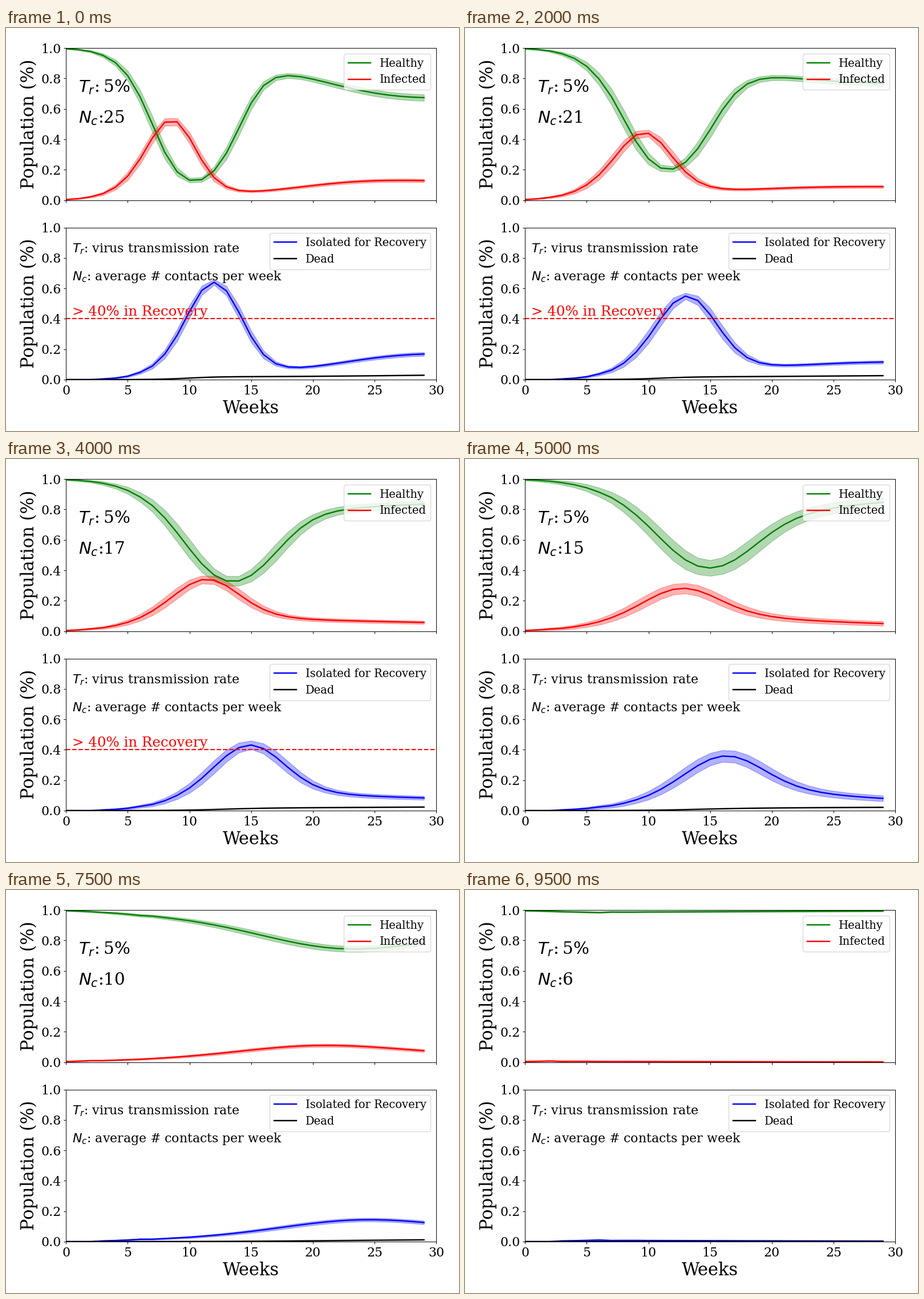
Recreate the animation shown at these times as a matplotlib script. Size 794 by 706 pixels, loop 10 s.

```python
import numpy as np
import matplotlib.pyplot as plt
from matplotlib.animation import FuncAnimation

W, H, DPI = 794, 706, 88
FRAMES, INTERVAL = 20, 500
FIRST_CONTACTS = 25
WEEKS = np.arange(30)

SEED_CASES = 0.005
TRANSMISSION = 0.0455
WEEKS_INFECTED, WEEKS_ISOLATED = 3, 4
DEATH_RATE = 0.02            # on entering isolation
ISOLATION_LEAK = 0.05        # infectiousness while isolated
REINFECTION = 0.42           # susceptibility after recovery

plt.rcParams["font.family"] = "DejaVu Serif"
plt.rcParams["mathtext.fontset"] = "dejavusans"


def outbreak(contacts):
    """Weekly shares of healthy, infected, isolated and dead people."""
    cases = np.zeros(len(WEEKS))
    cases[0] = SEED_CASES
    naive = 1 - SEED_CASES
    rows = []
    for week in WEEKS:
        onset = max(0, week + 1 - WEEKS_INFECTED)
        release = max(0, onset - WEEKS_ISOLATED)
        infected = cases[onset:week + 1].sum()
        isolated = (1 - DEATH_RATE) * cases[release:onset].sum()
        dead = DEATH_RATE * cases[:onset].sum()
        healthy = 1 - infected - isolated - dead
        rows.append((healthy, infected, isolated, dead))

        force = TRANSMISSION * (contacts + 0.5) * (infected + ISOLATION_LEAK * isolated)
        risk = 1 - np.exp(-force)
        if week + 1 < len(WEEKS):
            cases[week + 1] = risk * (naive + REINFECTION * (healthy - naive))
        naive *= 1 - risk
    return np.transpose(rows)


def spread(values, contacts, scale):
    """Band half-width from uncertain timing and uncertain size."""
    timing = 0.25 + 0.03 * (FIRST_CONTACTS - contacts)
    size = 0.03 + 0.034 * np.exp(-((contacts - 15) / 2) ** 2)
    share = np.minimum(values, 1 - values).clip(0)
    return np.hypot(timing * np.gradient(values), scale * size * np.sqrt(share))


def make_axes(top, bottom):
    ax = fig.add_axes([105.2 / W, 1 - bottom / H, 649 / W, (bottom - top) / H])
    ax.set(xlim=(0, 30), ylim=(0, 1), xticks=range(0, 31, 5))
    ax.tick_params(labelsize=18)
    ax.set_ylabel("Population (%)", fontsize=25)
    return ax


def add_line(ax, color, label):
    return ax.plot(WEEKS, 0 * WEEKS, color=color, lw=2, label=label)[0]


fig = plt.figure(figsize=(W / DPI, H / DPI), dpi=DPI, facecolor="white")
upper = make_axes(35, 301.8)
lower = make_axes(349.6, 616)
upper.tick_params(labelbottom=False)
lower.set_xlabel("Weeks", fontsize=25)

lines = [add_line(upper, "green", "Healthy"),
         add_line(upper, "red", "Infected"),
         add_line(lower, "blue", "Isolated for Recovery"),
         add_line(lower, "black", "Dead")]
band_scales = [1.25, 1, 1]
for ax in (upper, lower):
    ax.legend(loc="upper right", fontsize=16)

upper.text(1, 0.71, r"$T_r$:$\:$5%", fontsize=24)
contacts_text = upper.text(1, 0.51, "", fontsize=24)
lower.text(0.5, 0.836, "$T_r$: virus transmission rate", fontsize=18)
lower.text(0.5, 0.652, "$N_c$: average # contacts per week", fontsize=18)
warning = [lower.axhline(0.4, color="red", ls="--", lw=1.7),
           lower.text(0.5, 0.42, "> 40% in Recovery", color="red", fontsize=20)]
bands = []


def update(frame):
    contacts = FIRST_CONTACTS - frame
    shares = outbreak(contacts)
    while bands:
        bands.pop().remove()
    for line, values in zip(lines, shares):
        line.set_ydata(values)
    for line, values, scale in zip(lines, shares, band_scales):
        margin = spread(values, contacts, scale)
        bands.append(line.axes.fill_between(
            WEEKS, (values - margin).clip(0), (values + margin).clip(0, 1),
            color=line.get_color(), alpha=0.3))
    contacts_text.set_text(f"$N_c$:{contacts}")
    for artist in warning:
        artist.set_visible(contacts > 16)
    return lines + bands + warning + [contacts_text]


anim = FuncAnimation(fig, update, frames=FRAMES, interval=INTERVAL,
                     init_func=lambda: update(0), repeat=True, repeat_delay=0,
                     blit=False)
plt.show()
```
